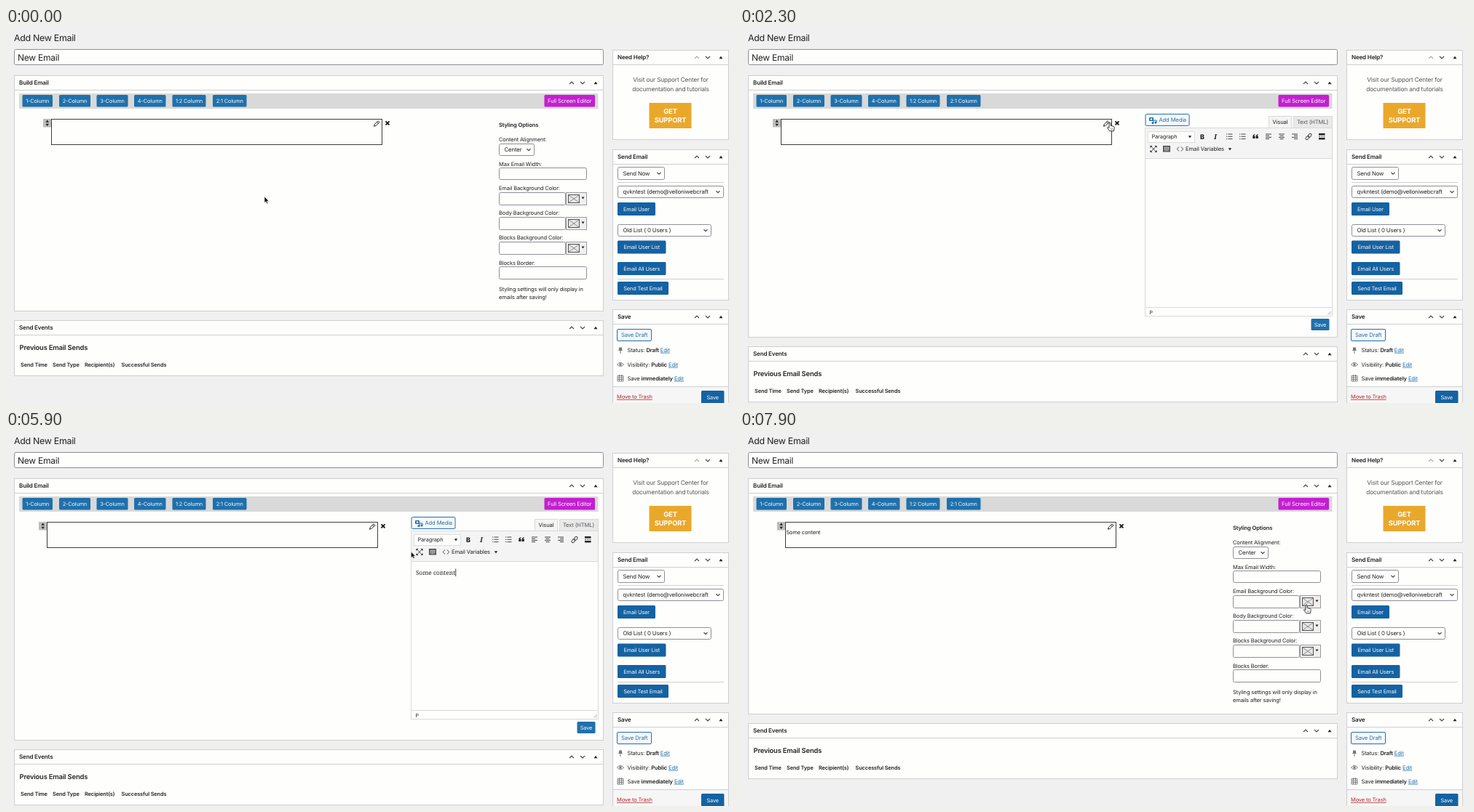
An HTML page that plays this animation: 1000x516 px, repeating every 8000 ms.

```html
<!DOCTYPE html>
<html lang="en">
<head>
<meta charset="utf-8">
<title>Email builder</title>
<style>
html, body { margin: 0; width: 100%; height: 100%; overflow: hidden; background: #f0f0f0; }
svg { display: block; width: 100vw; height: 100vh; }
text { font-family: Inter, "Open Sans", sans-serif; letter-spacing: -.018em; white-space: pre; text-rendering: geometricPrecision; }
.serif { font-family: "Noto Serif", serif; letter-spacing: 0; }
.line { fill: none; stroke: #444; stroke-width: 1; }
</style>
</head>
<body>
<svg id="stage" viewBox="0 0 1000 516" preserveAspectRatio="none"></svg>
<script>
const INK = '#222224', BLUE = '#1f70ab', DARK = '#1562a2', PAGE = '#f0f0f0', PAPER = '#fefefd';
const EDGE = '#cfcfd0', FIELD = '#8f8f96', MUTED = '#77777a', PALE = '#f4f4f4';

// Drawing helpers; every text is placed by the middle of its capitals.
const rect = (x, y, w, h, fill, stroke = 'none', r = 0, extra = '') =>
  `<rect x="${x}" y="${y}" width="${w}" height="${h}" rx="${r}" fill="${fill}" stroke="${stroke}" ${extra}/>`;
const text = (x, y, s, size = 7.5, fill = INK, extra = '') =>
  `<text x="${x}" y="${y + size * .36}" font-size="${size}" fill="${fill}" ${extra}>${s}</text>`;
const path = (d, extra = '') => `<path class="line" d="${d}" ${extra}/>`;
const solid = (d, fill = INK) => `<path d="${d}" fill="${fill}"/>`;
const group = (id, body) => `<g id="${id}">${body}</g>`;
const bold = 'font-weight="600"', middle = 'text-anchor="middle"';

const chevron = (x, y, dir, color = '#444', s = 3) =>
  path(`M${x - s} ${y - dir * s / 2}l${s} ${dir * s}l${s} ${-dir * s}`, `style="stroke:${color};stroke-width:1.1"`);
const down = (x, y, s = 2.2) => solid(`M${x - s} ${y - s * .7}h${2 * s}l${-s} ${s * 1.5}z`);
const button = (x, y, w, h, label, fill = BLUE, size = 7.4) =>
  rect(x, y, w, h, fill, 'none', 1.5) + text(x + w / 2, y + h / 2, label, size, '#f8fafc', middle);
const outlined = (x, y, w, h) => rect(x + .5, y + .5, w - 1, h - 1, '#f8f9fa', BLUE, 1.5);
const field = (x, y, w, h) => rect(x + .5, y + .5, w - 1, h - 1, PAPER, FIELD, 2);
const select = (x, y, w, h, label, size = 7.8) =>
  field(x, y, w, h) + text(x + 7.5, y + h / 2, label, size) + chevron(x + w - 8, y + h / 2, 1, '#444', 2.5);

function panel(x, y, w, h, title, firstUp = '#444') {
  const r = x + w, c = y + 10.5;
  return rect(x + .5, y + .5, w - 1, h - 1, PAPER, EDGE) +
    path(`M${x} ${y + 21 - .5}h${w}`, `style="stroke:${EDGE}"`) +
    text(x + 7, c, title, 8, INK, bold) +
    chevron(r - 44, c, -1, firstUp) + chevron(r - 29, c, 1) +
    solid(`M${r - 13.5} ${c + 1.8}l2.5 -3.6l2.5 3.6z`);
}

function sideColumn() {
  const link = s => `<tspan fill="${BLUE}" text-decoration="underline">${s}</tspan>`;
  const status = (y, label, value) =>
    text(853.5, y, `${label} <tspan font-weight="600">${value}</tspan> ${link('Edit')}`, 7.6);
  const rule = y => path(`M840 ${y}h146`, `style="stroke:${EDGE}"`);
  const support = middle + ' font-weight="700"';
  return panel(833, 30, 160, 124, 'Need Help?', '#a8a8aa') +
    text(913, 71.5, 'Visit our Support Center for', 8.3, '#555558', middle) +
    text(913, 84.5, 'documentation and tutorials', 8.3, '#555558', middle) +
    rect(883.5, 103, 58, 35, '#eaa82b') +
    text(912.5, 114.5, 'GET', 9.4, '#fff', support) +
    text(912.5, 127, 'SUPPORT', 9.4, '#fff', support) +
    panel(833, 167, 160, 208, 'Send Email') +
    select(840, 191, 65, 18, 'Send Now') + rule(212.5) +
    select(840, 217, 146, 17, 'qvkntest (demo@velloniwebcraft') +
    button(840, 240, 52, 18, 'Email User', DARK) +
    select(840, 270, 129, 17, 'Old List ( 0 Users )') +
    button(840, 292.5, 66.5, 18, 'Email User List', DARK) +
    button(840, 322, 66.5, 18, 'Email All Users', DARK) + rule(345.5) +
    button(840, 349, 70, 18, 'Send Test Email', DARK) +
    panel(833, 387, 160, 140, 'Save') +
    rect(833.5, 493.5, 159, 30, '#f6f6f7', EDGE) +
    outlined(839, 414, 48, 17) + text(863.2, 422.5, 'Save Draft', 7.7, BLUE, middle) +
    status(443, 'Status:', 'Draft') + status(463, 'Visibility:', 'Public') + status(482, 'Save', 'immediately') +
    solid('M842 439.5h4v3l1 1.5h-2.5v4h-1v-4h-2.5l1 -1.5z', MUTED) +
    path('M839.5 463q4.500 -5 9 0q-4.500 5 -9 0z', `style="stroke:${MUTED}"`) +
    `<circle cx="844" cy="463" r="1.700" fill="${MUTED}"/>` +
    path('M840 478.500h8v7.500h-8zM840 481h8M842.500 477v9M845.500 477v9M840 483.500h8', `style="stroke:${MUTED};stroke-width:.9"`) +
    text(839, 507.5, 'Move to Trash', 7.5, '#b3282c', 'text-decoration="underline"') +
    button(955, 499, 31.5, 18, 'Save', DARK);
}

function toolbar() {
  const tabs = [[22.5, 41.5, '1-Column'], [73, 43, '2-Column'], [124.5, 43, '3-Column'],
    [176, 43.5, '4-Column'], [228.5, 46, '1:2 Column'], [284, 46.5, '2:1 Column']];
  return rect(18, 90, 795.5, 21, '#d9d9d9') +
    tabs.map(([x, w, s]) => button(x, 92, w, 16.5, s)).join('') +
    button(739.5, 92, 69.5, 16.5, 'Full Screen Editor', '#c31fd0', 7.6);
}

function block() {
  return rect(51, 125, 11.5, 11.5, '#bdbdbd') +
    solid('M54.500 129.800l2.200 -3.300l2.200 3.300zM54.500 131.700l2.200 3.300l2.200 -3.300z') +
    rect(62.5, 125.5, 454, 35, PAPER, '#3c3c3c') +
    path('M505.500 135.200l.7 -2.600l4.800 -4.800l1.900 1.900l-4.800 4.800zM509.500 129.300l1.900 1.900', 'style="stroke:#1c1c1c"') +
    path('M521.500 128.300l5 5M526.500 128.300l-5 5', 'style="stroke:#111;stroke-width:1.7"');
}

function styling() {
  const colorRow = (y, label, id) => text(677, y, label) + field(677, y + 5.5, 92, 18) +
    rect(769.5, y + 6, 28, 17, PAGE, '#9c9c9e', 0, id ? `id="${id}"` : '') +
    rect(772.5, y + 9, 15, 11, '#e6e6e6', '#555558') +
    path(`M773 ${y + 9.5}l14 10m0 -10l-14 10`, `style="stroke:${MUTED};stroke-width:.8"`) +
    down(792.5, y + 13.5, 2);
  return text(677, 133.5, 'Styling Options', 7.6, INK, bold) +
    text(677, 153.5, 'Content Alignment:') + select(677, 159, 49, 17, 'Center') +
    text(677, 187, 'Max Email Width:') + field(677, 192, 121, 17) +
    colorRow(220.5, 'Email Background Color:', 'swatch') +
    colorRow(254.5, 'Body Background Color:') + colorRow(288.5, 'Blocks Background Color:') +
    text(677, 323.5, 'Blocks Border:') + field(677, 328, 121, 18) +
    text(677, 359, 'Styling settings will only display in') + text(677, 370, 'emails after saving!');
}

function editor() {
  const bars = (x, widths, shift) => widths.map((w, i) =>
    `M${x - 4 + (8 - w) * shift} ${146 + i * 2.2}h${w}`).join('');
  const list = x => `M${x - 1.5} 146h6m-6 3.300h6m-6 3.300h6M${x - 4} 146h1.300m-1.300 3.300h1.300m-1.300 3.300h1.300`;
  const quote = x => solid(`M${x} 149.500q0 -3 3 -3.500v1q-1.300 .5 -1.300 1.500h1.500v3.500h-3.200z`);
  const rim = '#dadadb';
  return outlined(556.5, 118, 61, 17) + text(575.5, 126.5, 'Add Media', 7.6, BLUE) +
    rect(562, 123, 6, 5, BLUE, 'none', 1) + '<circle cx="565" cy="125.500" r="1.300" fill="#fff"/>' +
    path('M568 130.500v-3.500h4v3', `style="stroke:${BLUE}"`) +
    `<circle cx="567" cy="130.500" r="1.500" fill="${BLUE}"/><circle cx="571" cy="130" r="1.500" fill="${BLUE}"/>` +
    rect(760.5, 121.5, 53, 16, '#e9e9e9', rim) + text(786.5, 129.5, 'Text (HTML)', 7.6, '#555558', middle) +
    rect(726.5, 121.5, 31, 17, PALE, rim) + text(742, 129.5, 'Visual', 7.6, INK, middle) +
    rect(556.5, 137.5, 257, 259, PAPER, rim) + rect(557, 138, 256, 41, PALE) +
    path('M557 179.500h256M557 384.500h256', `style="stroke:${rim}"`) +
    rect(560.5, 142.5, 64, 15, PAPER, '#dedee0') + text(565.5, 149.7, 'Paragraph', 7.4) + down(618, 149.8) +
    text(635, 149.5, 'B', 9, INK, middle + ' font-weight="800"') +
    text(653, 149.5, 'I', 9.5, INK, middle + ' class="serif" font-style="italic" font-weight="700"') +
    path(list(672) + list(690) + bars(726, [8, 5, 8, 5], 0) + bars(744, [8, 5, 8, 5], .5) + bars(762, [8, 5, 8, 5], 1)) +
    quote(704.3) + quote(708.6) +
    '<g transform="rotate(-45 781 149.500)">' + rect(776, 147.7, 5.4, 3.6, 'none', '#444', 1.8) +
    rect(780.6, 147.7, 5.4, 3.6, 'none', '#444', 1.8) + '</g>' +
    rect(795, 145, 8.5, 2.5, INK) + rect(795, 151, 8.5, 2.5, INK) + path('M795 149.300h2m1.200 0h2m1.200 0h2') +
    path('M565 163.500l6 6m0 -6l-6 6') +
    solid('M563.500 162h3l-3 3zM572.500 162v3l-3 -3zM563.500 171v-3l3 3zM572.500 171h-3l3 -3z') +
    rect(581.5, 162.5, 9, 7.5, '#7d7d7f', '#444') +
    path('M583 164.500h6.500m-6.500 2h6.500m-5 2h3.500', `style="stroke:${PALE};stroke-width:.8;stroke-dasharray:1 .8"`) +
    path('M603 163.500l-2.700 3l2.700 3m3 -6l2.700 3l-2.700 3') +
    text(612, 166.5, 'Email Variables', 7.7) + down(673, 166.7) +
    text(562.5, 391, 'P', 7) + path('M807.500 394.500l4.500 -4.500m-2 4.500l2 -2', 'style="stroke:#999;stroke-width:.8"') +
    text(563, 195, '', 8.4, INK, 'class="serif" id="typed"') +
    rect(563, 189.5, .8, 10.5, '#111', 'none', 0, 'id="caret"') +
    button(784.5, 400, 25, 16, 'Save');
}

function events() {
  const heads = [[20, 'Send Time'], [64, 'Send Type'], [108, 'Recipient(s)'], [158.5, 'Successful Sends']];
  return panel(11, 402, 810, 77, 'Send Events') +
    text(18.5, 440, 'Previous Email Sends', 9.4, INK, bold) +
    heads.map(([x, s]) => text(x, 463.5, s, 7.4, INK, bold)).join('');
}

const pointers =
  group('arrow', '<path d="M0 0v8.500l2 -1.800l1.400 3l1.400 -.7l-1.400 -2.800h2.600z" fill="#0c0c0c" stroke="#fff" stroke-width=".5"/>') +
  group('hand', '<path d="M-1 .8q1.300 -1.600 2.200 0v3.600l4 1q1.200 .5 1 2l-.8 4.400h-5.600l-3.400 -4.600q.7 -1.600 2.600 .2z" ' +
    'fill="#fff" stroke="#1c1c1c" stroke-width=".9"/>' + path('M1.600 8v2.200m1.800 -2.200v2.200', 'style="stroke-width:.6"'));

document.getElementById('stage').innerHTML =
  rect(0, 0, 1000, 516, PAGE) +
  text(11, 14, 'Add New Email', 12.4, INK, 'style="letter-spacing:-.3px"') +
  rect(11.5, 29.5, 809, 21, PAPER, FIELD, 2) +
  text(16, 41, 'New Email', 12, INK, 'style="letter-spacing:-.25px"') +
  group('build', panel(11, 65, 810, 325, 'Build Email')) + toolbar() +
  group('block', block() + text(63.5, 139.5, 'Some content', 7.4, INK, 'id="content"')) +
  group('styling', styling()) + group('editor', editor()) + group('events', events()) +
  sideColumn() + pointers;

const el = id => document.getElementById(id);
const show = (id, on) => el(id).setAttribute('display', on ? 'inline' : 'none');
const move = (id, x, y) => el(id).setAttribute('transform', `translate(${x} ${y})`);
const buildBox = el('build').firstChild;

const LOOP = 8000, STEP = 100, OPEN = 2300, CLOSE = 6800, GROW = 36;
const PHRASE = 'Some content';
const KEYS = [4300, 4500, 4700, 4800, 5000, 5100, 5200, 5300, 5400, 5500, 5600, 5800];
const ROUTE = [[0, 355, 232], [1600, 508, 130], [2500, 508, 130], [3400, 511, 135],
  [5700, 518, 128], [6560, 798, 406], [6900, 798, 406], [7900, 778, 239]];

function pointerAt(t) {
  const i = ROUTE.findIndex(k => k[0] > t);
  if (i < 0) return ROUTE[ROUTE.length - 1].slice(1);
  const [t0, x0, y0] = ROUTE[i - 1], [t1, x1, y1] = ROUTE[i];
  const u = (t - t0) / (t1 - t0), e = u * u * (3 - 2 * u);
  return [x0 + (x1 - x0) * e, y0 + (y1 - y0) * e];
}

function render(t) {
  const open = t >= OPEN && t < CLOSE;
  const grow = open ? GROW : 0;
  show('editor', open);
  show('styling', !open);
  show('content', t >= CLOSE);
  move('block', open ? -6 : 0, 0);
  move('events', 0, grow);
  buildBox.setAttribute('height', 324 + grow);

  const count = KEYS.filter(k => k <= t).length;
  const typed = el('typed');
  typed.textContent = PHRASE.slice(0, count);
  el('caret').setAttribute('x', 563 + (open && count ? typed.getComputedTextLength() + .3 : 0));
  show('caret', count > 0 || Math.floor((t + 100) / 500) % 2 === 1);

  // The pointer hides while typing.
  const hidden = t >= 4100 && t < 5900;
  const hover = t >= 7700;
  const hand = (t >= 1500 && t < 2600) || (t >= 6500 && t < 7000) || hover;
  const [x, y] = pointerAt(t);
  show('arrow', !hidden && !hand);
  show('hand', !hidden && hand);
  move('arrow', x, y);
  move('hand', x, y);
  el('swatch').setAttribute('fill', hover ? '#f3efee' : PAGE);
}

const start = performance.now();
function tick() {
  const t = (performance.now() - start) % LOOP;
  render(Math.floor(t / STEP) * STEP);
  requestAnimationFrame(tick);
}
tick();
</script>
</body>
</html>
```
